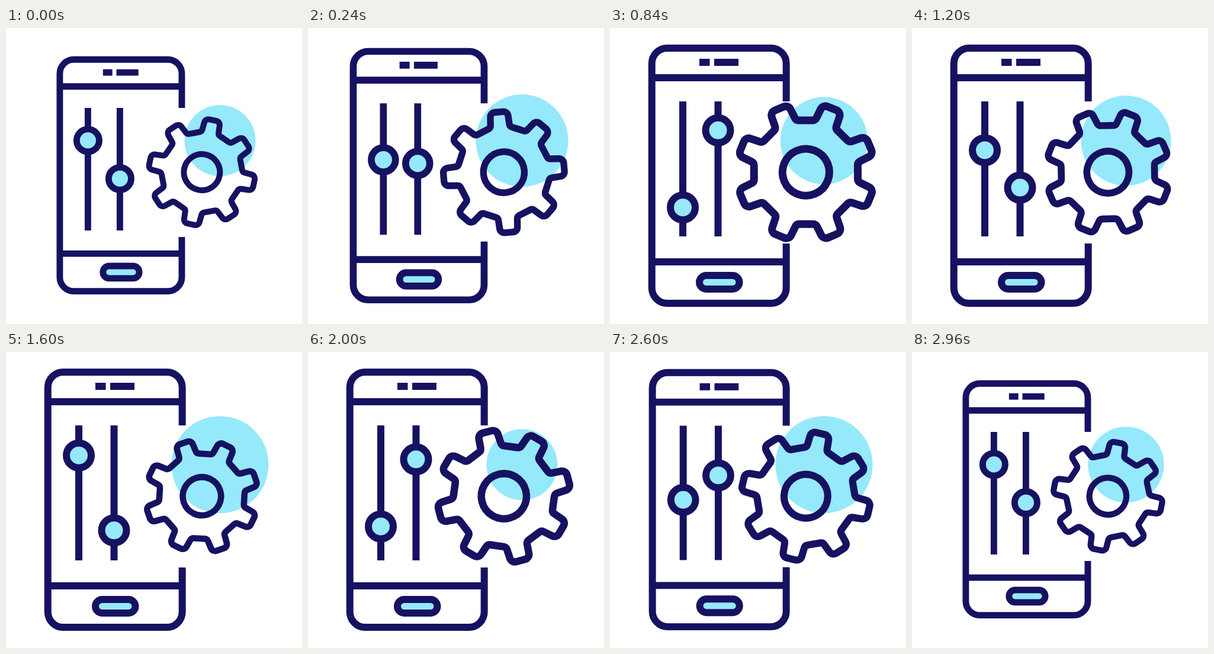
Animation of 500 by 500 pixels, one loop 3000 ms. Source, as an HTML page with a canvas:

```html
<!DOCTYPE html>
<html lang="en">
<head>
<meta charset="utf-8">
<title>Phone settings</title>
<style>
  html, body { margin: 0; width: 100%; height: 100%; overflow: hidden; background: #fff; }
  canvas { display: block; width: 500px; height: 500px; }
</style>
</head>
<body>
<canvas id="stage" width="500" height="500"></canvas>
<script>
const ctx = document.getElementById('stage').getContext('2d');
const NAVY = '#161261', CYAN = '#95e9fb';
const LOOP = 3000, STEP = 40;
const TAU = Math.PI * 2;

const ease = u => u * u * (3 - 2 * u);

// Rises from 0 to 1 and falls back once per period.
const pulse = (t, period, power) =>
  1 - Math.pow(Math.abs(2 * (t % period) / period - 1), power);

// Eased value at time t through [time, value] keys.
function track(keys, t) {
  for (let i = 1; i < keys.length; i++) {
    const [t0, a] = keys[i - 1], [t1, b] = keys[i];
    if (t < t1) return a + (b - a) * ease((t - t0) / (t1 - t0));
  }
  return keys[keys.length - 1][1];
}

const ZOOM = [[0, 0.908], [370, 1], [2554, 1], [2918, 0.908]];
const LOW = 315, HIGH = 161;
const knobKeys = (rest, a, b) => [
  [0, rest], [678, a], [710, a], [1475, b], [2155, a], [2250, a], [2950, rest]
];
const LEFT = knobKeys(184.5, LOW, HIGH);
const RIGHT = knobKeys(255.5, HIGH, LOW);

function line(x0, y0, x1, y1) {
  ctx.beginPath();
  ctx.moveTo(x0, y0);
  ctx.lineTo(x1, y1);
  ctx.stroke();
}

function disc(x, y, r) {
  ctx.beginPath();
  ctx.arc(x, y, r, 0, TAU);
}

function slider(x, y) {
  line(x, 124, x, 352);
  disc(x, y, 21);
  ctx.fillStyle = CYAN;
  ctx.fill();
  ctx.stroke();
}

function phone(t) {
  const s = track(ZOOM, t);
  const l = 70.7, r = 297.7, top = 34, bottom = 465, round = 26;
  ctx.save();
  ctx.translate(290, 244);
  ctx.scale(s, s);
  ctx.translate(-290, -244);
  ctx.lineWidth = 12;

  ctx.beginPath();
  ctx.moveTo(r, 124);
  ctx.arcTo(r, top, l, top, round);
  ctx.arcTo(l, top, l, bottom, round);
  ctx.arcTo(l, bottom, r, bottom, round);
  ctx.arcTo(r, bottom, r, 364, round);
  ctx.lineTo(r, 364);
  ctx.stroke();

  line(l, 84, r, 84);
  line(l, 395, r, 395);
  line(151, 58, 168.5, 58);
  line(176, 58, 217, 58);

  ctx.beginPath();
  ctx.arc(162.5, 429.5, 11.5, TAU / 4, TAU * 3 / 4);
  ctx.arc(207, 429.5, 11.5, -TAU / 4, TAU / 4);
  ctx.closePath();
  ctx.fillStyle = CYAN;
  ctx.fill();
  ctx.stroke();

  slider(123, track(LEFT, t));
  slider(182.5, track(RIGHT, t));
  ctx.restore();
}

// Corners of one tooth: [half width, distance from centre, rounding].
const TOOTH = [[-14.3, 67.2, 5.5], [-12.8, 89.8, 7], [12.8, 89.8, 7], [14.3, 67.2, 5.5]];

function gearPath() {
  const pts = [];
  for (let i = 0; i < 8; i++) {
    const c = Math.cos(i * TAU / 8), s = Math.sin(i * TAU / 8);
    for (const [x, y, r] of TOOTH) pts.push([x * c + y * s, x * s - y * c, r]);
  }
  const n = pts.length, last = pts[n - 1];
  ctx.beginPath();
  ctx.moveTo((last[0] + pts[0][0]) / 2, (last[1] + pts[0][1]) / 2);
  pts.forEach(([x, y, r], i) => {
    const next = pts[(i + 1) % n];
    ctx.arcTo(x, y, next[0], next[1], r);
  });
  ctx.closePath();
}

function gear(t) {
  const s = 1 + 0.31 * pulse(t, 1500, 1.5);
  const turn = 11.8 + 360 * Math.min(1, t / 2970) - 1.4 * Math.sin(TAU * t / LOOP);
  ctx.save();
  ctx.translate(330.9, 243.6);
  ctx.rotate(turn * TAU / 360);
  ctx.scale(s, s);
  ctx.lineWidth = 10;
  gearPath();
  ctx.stroke();
  disc(0, 0, 30.5);
  ctx.stroke();
  ctx.restore();
}

function draw(t) {
  ctx.fillStyle = '#fff';
  ctx.fillRect(0, 0, 500, 500);
  ctx.strokeStyle = NAVY;
  disc(361.5, 190.3, 60 + 22.5 * pulse(t, 1000, 2.45));
  ctx.fillStyle = CYAN;
  ctx.fill();
  phone(t);
  gear(t);
}

const start = performance.now();
function tick() {
  const t = (performance.now() - start) % LOOP;
  draw(Math.floor(t / STEP) * STEP);
  requestAnimationFrame(tick);
}
tick();
</script>
</body>
</html>
```
